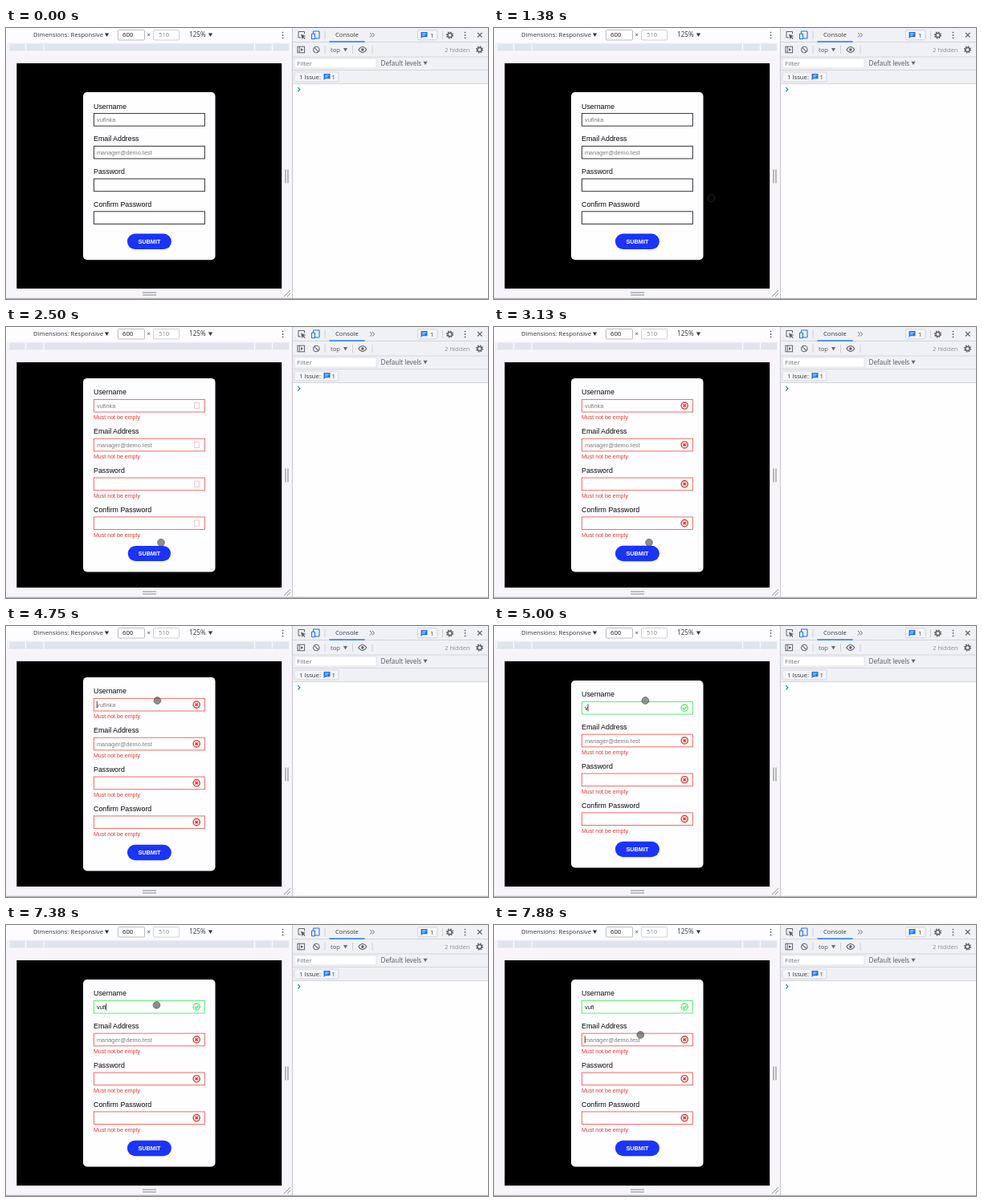
Write an HTML page that moves like this. It is 600 px wide and 338 px high and loops after 8 s.

```html
<!DOCTYPE html>
<html lang="en">
<head>
<meta charset="utf-8">
<title>Form validation</title>
<style>
  html, body { margin: 0; width: 100%; height: 100%; overflow: hidden; background: #fcfbfe; }
  svg { display: block; width: 600px; height: 338px; }
  .ui { font-family: "Open Sans", "Noto Sans", sans-serif; font-size: 7.7px; fill: #33363a; }
  .form { font-family: "Liberation Sans", Arial, sans-serif; }
</style>
</head>
<body>
<svg id="stage" viewBox="0 0 600 338" xmlns="http://www.w3.org/2000/svg">
  <g id="chrome" class="ui"></g>
  <g id="form" class="form"></g>
  <g id="pointer"></g>
</svg>
<script>
const LOOP = 8000, STEP = 125;
const CARD_X = 96, CARD_W = 164.5, CENTER_Y = 184.7;
const ROW = 40.75, ERROR_H = 8.1;
const RED = '#e03a35', GREEN = '#5fe879', BLUE = '#1a73e8', GREY = '#5f6368';
const FIELDS = [
  ['Username', 'vufinka'],
  ['Email Address', 'manager@demo.test'],
  ['Password', ''],
  ['Confirm Password', '']
];
const TYPED = 'vufi';

const byId = id => document.getElementById(id);
const rect = (x, y, w, h, fill, more = '') =>
  `<rect x="${x}" y="${y}" width="${w}" height="${h}" fill="${fill}" ${more}/>`;
const text = (x, y, s, more = '') => `<text x="${x}" y="${y}" ${more}>${s}</text>`;
const line = (d, color, w = 1, more = '') =>
  `<path d="${d}" fill="none" stroke="${color}" stroke-width="${w}" ${more}/>`;
const circle = (x, y, r, fill, more = '') =>
  `<circle cx="${x}" cy="${y}" r="${r}" fill="${fill}" ${more}/>`;
const arrow = (x, y, fill = '#33363a') =>
  `<path d="M${x - 2.6} ${y - 2}h5.2l-2.6 4.4z" fill="${fill}"/>`;
const kebab = (x, y) => [-3.4, 0, 3.4].map(d => circle(x, y + d, 0.9, GREY)).join('');
const gear = (x, y) =>
  circle(x, y, 3.8, 'none', `stroke="${GREY}" stroke-width="1.6" stroke-dasharray="1.6 1.38"`) +
  circle(x, y, 2.6, 'none', `stroke="${GREY}" stroke-width="1.5"`);
const bubble = (x, y) =>
  `<path d="M${x} ${y}h8v6.2h-6l-2 2z" fill="${BLUE}"/>` +
  line(`M${x + 1.6} ${y + 2}h4.8M${x + 1.6} ${y + 4}h3.4`, '#fff', 0.8);

function deviceBar() {
  const ticks = [3.5, 24.5, 47, 309.5, 331.5, 353];
  return rect(0, 0, 356, 338, '#f7f5fa') + rect(0, 0, 356, 18, '#fdfcfe') +
    text(34, 11.4, 'Dimensions: Responsive') + arrow(125.5, 8.5) +
    rect(139.5, 2.5, 33, 12.5, '#fff', 'rx="1" stroke="#a9acb3" stroke-width=".8"') +
    text(145, 11.4, '600', 'fill="#111"') + text(175.5, 11.4, '×') +
    rect(183.5, 2.5, 32, 12.5, '#fff', 'rx="1" stroke="#c3c5ca" stroke-width=".8"') +
    text(190, 11.4, '510', 'fill="#85888d"') +
    text(228, 11.4, '125%', 'font-size="8.2"') + arrow(254.5, 8.5) + kebab(344.5, 9) +
    rect(0, 17.5, 356, 12.5, '#f9f8fb') + rect(2, 19.5, 351, 9, '#e0e4ed') +
    ticks.map(x => line(`M${x} 19.5v9`, '#fafafc', 1.3)).join('') +
    rect(13.3, 44, 329.9, 281, '#000') +
    line('M348 176.5v17M351 176.5v17', '#85878b', 1.1) +
    line('M170 330h17M170 333h17', '#85878b', 1.1) +
    line('M346 335l8-8M350 335l4-4', '#85878b', 0.9);
}

function consolePanel() {
  const rule = y => line(`M357 ${y}h243`, '#cdcfd5', 0.8);
  const split = (x, y) => line(`M${x} ${y}v10`, '#c6c8ce', 0.8);
  return rect(357, 0, 243, 338, '#fefdff') + rect(357, 0, 243, 69.5, '#f0f1f5') +
    rule(17.5) + rule(36) + rule(52.5) + rule(69.5) +
    line('M356.5 0v338', '#c6c7cd', 1) +
    // top toolbar
    line('M367 12h-3v-7.5h7.5v3', GREY, 1) +
    `<path d="M367 7.5l6.2 2.6-2.6 1 2 2-1 1-2-2-1 2.3z" fill="${GREY}"/>` +
    rect(382.5, 4, 7.5, 9, 'none', `rx=".8" stroke="${BLUE}" stroke-width="1.1"`) +
    rect(380.5, 7.2, 4, 6.6, '#f0f1f5', `rx=".6" stroke="${BLUE}" stroke-width="1.1"`) +
    split(397, 4) + text(410, 11.4, 'Console') + rect(402.5, 16.4, 44, 1.4, BLUE) +
    line('M453 6l2.5 2.8-2.5 2.8M456 6l2.5 2.8-2.5 2.8', GREY, 0.9) +
    rect(512.5, 2.8, 24.5, 12, '#f5f6f9', 'rx="1.5" stroke="#c9cbd1" stroke-width=".8"') +
    bubble(516.5, 5) + text(528, 11.5, '1') + split(543.5, 4) + gear(552.5, 9) + kebab(571.5, 9) +
    line('M587 6l5.5 5.5M592.5 6l-5.5 5.5', GREY, 1.1) +
    // console toolbar
    rect(363, 23.2, 8.6, 7.6, 'none', `stroke="${GREY}" stroke-width="1"`) +
    line('M365.3 23v8', GREY, 0.9) + `<path d="M367 25v4l3.2-2z" fill="${GREY}"/>` +
    circle(386.3, 27, 3.7, 'none', `stroke="${GREY}" stroke-width="1.1"`) +
    line('M383.7 24.4l5.2 5.2', GREY, 1.1) + split(397, 22) +
    text(404, 29.8, 'top', 'fill="#55585d"') + arrow(422.5, 27, '#6a6d72') + split(431.5, 22) +
    line('M438.8 27q5-7 10 0q-5 7-10 0z', GREY, 1.1) + circle(443.8, 27, 1.8, GREY) + split(456, 22) +
    text(546, 29.8, '2 hidden', 'fill="#8b8e94"') + gear(589.5, 27) +
    // filter and issues
    rect(359.5, 38, 101.5, 12, '#fff', 'stroke="#d9dbe0" stroke-width=".7"') +
    text(362, 46.7, 'Filter', 'fill="#6f7277" font-size="8"') +
    text(466.5, 46.7, 'Default levels', 'fill="#55585d" font-size="8.1"') + arrow(522, 43.8, '#6a6d72') +
    rect(359, 55, 55, 12, '#f4f5f8', 'rx="1.5" stroke="#cdcfd5" stroke-width=".8"') +
    text(365, 63.8, '1 Issue:') + bubble(395.5, 57) + text(405.5, 63.8, '1') +
    line('M363.3 74.2l2.6 2.6-2.6 2.6', BLUE, 1.2) +
    line('M0 337.3h600', '#96979b', 0.9);
}

function statusIcon(kind, y) {
  if (kind === 'blank')
    return rect(234.7, y - 3.6, 5.6, 7.2, 'none', 'stroke="#eeb5b2" stroke-width=".8"');
  const color = kind === 'ok' ? GREEN : RED;
  const mark = kind === 'ok'
    ? `M234.8 ${y + 0.1}l1.7 1.8 3-3.4`
    : `M235.5 ${y - 1.7}l3.4 3.4M238.9 ${y - 1.7}l-3.4 3.4`;
  return circle(237.2, y, 4.1, 'none', `stroke="${color}" stroke-width="1.4"`) + line(mark, color, 1.6);
}

function field([label, hint], i, y, s) {
  const state = s.states[i];
  const border = { none: '#333', bad: '#ee6c66', ok: GREEN }[state];
  const value = i === 0 ? s.typed : '';
  const chars = { v: 0.5, u: 0.556, f: 0.278, i: 0.222 };
  const caretX = 113.3 + 7.35 * [...value].reduce((sum, c) => sum + chars[c], 0);
  let out = text(109, y + 20.5, label, 'font-size="8.85" fill="#080808"') +
    rect(109.4, y + 26.5, 138, 15.6, '#fff', `stroke="${border}" stroke-width="1"`) +
    text(113, y + 36.9, value || hint, `font-size="7.35" fill="${value ? '#111' : '#7b7b7e'}"`);
  if (s.focus === i) out += line(`M${caretX} ${y + 29.7}v8.8`, '#111', 0.8);
  if (state !== 'none') out += statusIcon(state === 'bad' && s.blank ? 'blank' : state, y + 34.2);
  if (state === 'bad') out += text(109, y + 51.5, 'Must not be empty', `font-size="7.05" fill="${RED}"`);
  return out;
}

function form(s) {
  const bad = s.states.filter(v => v === 'bad').length;
  const height = 209.2 + bad * ERROR_H;
  const top = CENTER_Y - height / 2;
  let y = top;
  let out = rect(CARD_X, top, CARD_W, height, '#fefdff', 'rx="5"');
  FIELDS.forEach((f, i) => {
    out += field(f, i, y, s);
    y += ROW + (s.states[i] === 'bad' ? ERROR_H : 0);
  });
  const mid = y + 23.2;
  return out + `<g transform="translate(178.4 ${mid}) scale(${s.press})">` +
    rect(-27.5, -9.7, 55, 19.4, '#1b34fa', 'rx="9.7"') +
    text(0, 2.6, 'SUBMIT', 'font-size="7.3" font-weight="700" fill="#fff" text-anchor="middle"') + '</g>';
}

// time, x, y
const PATH = [
  [0, 330, 150], [750, 283, 202], [1000, 283, 202], [1375, 270.5, 212.3],
  [2250, 270.5, 212.3], [2500, 193, 268.8], [3250, 193, 268.8],
  [4000, 188.4, 93], [7250, 188.4, 93], [7750, 182.3, 137]
];

function pointerAt(t) {
  const n = PATH.findIndex(p => p[0] > t);
  if (n < 0) return PATH[PATH.length - 1].slice(1);
  const [a, b] = [PATH[n - 1], PATH[n]];
  const u = (t - a[0]) / (b[0] - a[0]), e = u * u * (3 - 2 * u);
  return [a[1] + (b[1] - a[1]) * e, a[2] + (b[2] - a[2]) * e];
}

function stateAt(t) {
  const rest = t < 2500 ? 'none' : 'bad';
  const length = t < 5000 ? 0 : t < 5125 ? 1 : t < 6000 ? 2 : 4;
  return {
    states: [length ? 'ok' : rest, rest, rest, rest],
    typed: TYPED.slice(0, length),
    blank: t < 2625,
    focus: t >= 7750 ? 1 : t >= 4000 ? 0 : -1,
    press: t >= 2500 && t < 2750 ? 0.97 + 0.03 * (t - 2500) / 250 : 1
  };
}

function pointer(t) {
  if (t < STEP) return '';
  const [x, y] = pointerAt(t);
  const typing = t >= 5000 && t < 7375;
  return circle(x, y, 4.4, 'rgba(70,70,74,.62)', 'stroke="rgba(75,75,78,.65)" stroke-width=".9"') +
    (typing ? circle(x, y, 2.3, 'none', 'stroke="#aaaaad" stroke-width=".7"') : '');
}

// The black page hides most of the pointer, leaving a faint ring.
function faintPointer(t) {
  const [x, y] = pointerAt(t);
  return t < STEP ? '' : circle(x, y, 4.5, '#050505', 'stroke="#3a3a3a" stroke-width=".8" stroke-dasharray="1.5 .7"');
}

function render(now) {
  const t = Math.floor(now % LOOP / STEP) * STEP;
  const overPage = pointerAt(t)[0] > CARD_X + CARD_W;
  byId('form').innerHTML = form(stateAt(t));
  byId('pointer').innerHTML = overPage ? faintPointer(t) : pointer(t);
}

byId('chrome').innerHTML = deviceBar() + consolePanel();
const start = performance.now();
function tick() {
  render(performance.now() - start);
  requestAnimationFrame(tick);
}
tick();
</script>
</body>
</html>
```
